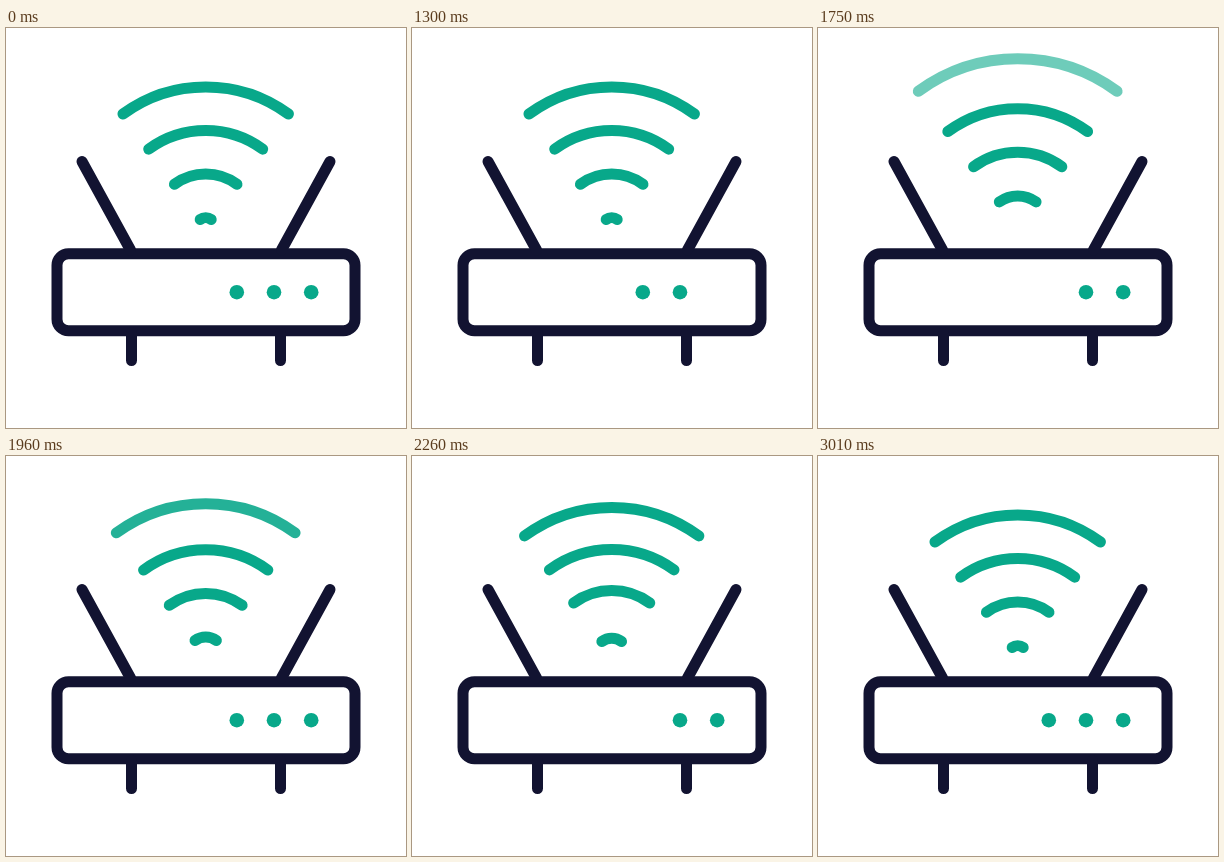
Animation, 400 px wide and 400 px high, one loop 3.04 s. Source, as an HTML page:

```html
<!DOCTYPE html>
<html lang="en">
<head>
<meta charset="utf-8">
<title>Router</title>
<style>
  html, body { margin: 0; width: 100%; height: 100%; overflow: hidden; background: #fff; }
  svg { display: block; width: 100%; height: 100%; }
  .line { fill: none; stroke-width: 11; stroke-linecap: round; }
</style>
</head>
<body>
<svg viewBox="0 0 400 400">
  <g class="line" stroke="#121331">
    <rect x="51" y="225.7" width="298" height="77" rx="11.5"/>
    <path d="M76 133.5L124.5 222M324 133.5L275.5 222M125.5 305V332.5M274.5 305V332.5"/>
  </g>
  <g id="waves" class="line" stroke="#08a88a"></g>
  <g id="dots" fill="#08a88a">
    <circle cx="230.8" cy="264.2" r="7.3"/>
    <circle cx="268" cy="264.2" r="7.3"/>
    <circle cx="305.2" cy="264.2" r="7.3"/>
  </g>
</svg>
<script>
const LOOP = 3040, REST = 1000, TICK = 30;
const CYCLE = 10, SETTLE = 40, END = 67;
const CX = 199.7, CY = 199, R0 = 9.3, GAP = 43.6, ANGLE = 36.2 * Math.PI / 180;
const EASE = [3, 2.4, 4, 3];                  // settling power per wave, inner to outer
const BLINKS = [[22, 40], [15, 48], [8, 56]]; // ticks at which each light goes off
const BLINK_LENGTH = 5;

const clamp = x => Math.min(1, Math.max(0, x));
const waves = Array.from({ length: 5 }, () =>
  document.getElementById('waves').appendChild(
    document.createElementNS('http://www.w3.org/2000/svg', 'path')));
const dots = [...document.getElementById('dots').children];

function drawWave(path, r, opacity) {
  const dx = r * Math.sin(ANGLE), y = CY - r * Math.cos(ANGLE);
  path.setAttribute('d', r > 0 ? `M${CX - dx} ${y}A${r} ${r} 0 0 1 ${CX + dx} ${y}` : '');
  path.setAttribute('opacity', opacity);
}

function draw(k) {
  const settling = k >= SETTLE;
  const p = settling ? (k - SETTLE) / (END - SETTLE) : k % CYCLE / CYCLE;

  for (let i = 0; i < 4; i++) {
    const move = settling ? 1 - (1 - p) ** EASE[i] : p;
    drawWave(waves[i], R0 + GAP * (i - 1 + move), 1);
  }

  // The outermost wave runs ahead and fades away.
  const rise = clamp(settling ? (k - SETTLE) / 12 : p / 0.8);
  const fade = clamp(settling ? 1 - (k - SETTLE - 2) / 12 : 1.085 - p);
  drawWave(waves[4], R0 + GAP * 3 + 45 * rise, fade);

  dots.forEach((dot, i) => {
    const off = BLINKS[i].some(b => k >= b && k < b + BLINK_LENGTH);
    dot.setAttribute('visibility', off ? 'hidden' : 'visible');
  });
}

const start = performance.now();
function frame() {
  const t = (performance.now() - start) % LOOP;
  draw(Math.min(END, Math.max(0, Math.floor((t - REST + 2) / TICK))));
  requestAnimationFrame(frame);
}
frame();
</script>
</body>
</html>
```
